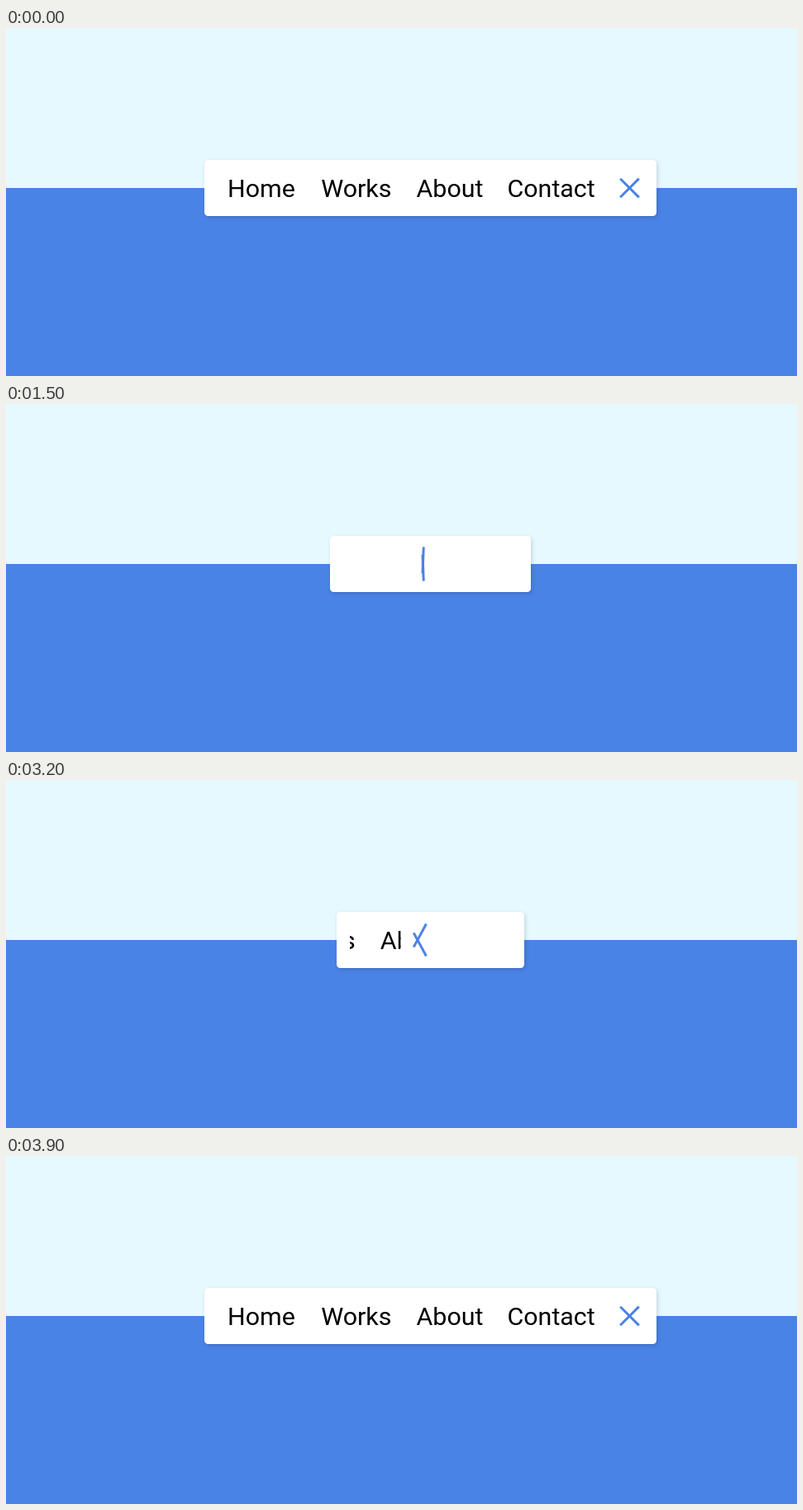
Write an HTML page with a canvas that moves like this. It is 957 px wide and 422 px high and loops after 5 s.

```html
<!DOCTYPE html>
<html lang="en">
<head>
<meta charset="utf-8">
<title>Folding navigation</title>
<style>
  html, body { margin: 0; width: 100%; height: 100%; overflow: hidden; background: #e5f9ff; }
  canvas { display: block; }
</style>
</head>
<body>
<canvas id="stage" width="957" height="422"></canvas>
<script>
const ctx = document.getElementById('stage').getContext('2d');

const LOOP = 5000, TICK = 100;
const SKY = '#e5f9ff', BLUE = '#4a83e6';
const BAR = { cx: 513.5, top: 160, height: 68, closed: 79, open: 547, pad: 16, radius: 4.5 };
const ICON = { width: 46, mid: 25, y: 194, gap: 4.5, length: 32, weight: 3, turn: 765, shift: 6.36 };

// Word origins, measured from the centre of the list
const WORDS = [['Home', -222.5], ['Works', -109.3], ['About', 6], ['Contact', 116]];

const CLOSE = { start: 900, time: 923 };
const OPEN = { start: 2910, time: 918 };

const clamp = v => Math.max(0, Math.min(1, v));
const progress = (t, move) => clamp((t - move.start) / move.time);

function drawBackground() {
  ctx.fillStyle = SKY;
  ctx.fillRect(0, 0, 957, 194);
  ctx.fillStyle = BLUE;
  ctx.fillRect(0, 194, 957, 228);
}

function drawBar(x, width) {
  ctx.save();
  ctx.shadowColor = 'rgba(0, 0, 0, 0.15)';
  ctx.shadowBlur = 5;
  ctx.shadowOffsetX = 1.5;
  ctx.shadowOffsetY = 2;
  ctx.fillStyle = '#fff';
  ctx.beginPath();
  ctx.roundRect(x, BAR.top, width, BAR.height, BAR.radius);
  ctx.fill();
  ctx.restore();
}

function drawWords(x, width) {
  ctx.save();
  ctx.beginPath();
  ctx.rect(x, BAR.top, width, BAR.height);
  ctx.clip();
  ctx.fillStyle = '#000';
  ctx.font = '30.4px Roboto, Arial, sans-serif';
  for (const [word, dx] of WORDS) ctx.fillText(word, x + width / 2 + dx, 205);
  ctx.restore();
}

// side: -1 for the upper line, 1 for the lower one
function drawLine(x, side, p) {
  ctx.save();
  ctx.translate(x, ICON.y + side * ICON.gap);
  ctx.rotate(side * ICON.turn * p * Math.PI / 180);
  ctx.translate(0, -side * ICON.shift * p);
  ctx.fillStyle = BLUE;
  ctx.fillRect(-ICON.length / 2, -ICON.weight / 2, ICON.length, ICON.weight);
  ctx.restore();
}

function draw(t) {
  const opening = t >= OPEN.start;
  const p = opening ? progress(t, OPEN) : 1 - progress(t, CLOSE);
  const left = Math.round(BAR.cx - (BAR.closed + (BAR.open - BAR.closed) * p) / 2);
  const width = 2 * (BAR.cx - left);
  const inner = width - 2 * BAR.pad;
  const listX = left + BAR.pad;
  const listWidth = Math.min(inner * p, inner - ICON.width);

  drawBackground();
  drawBar(left, width);
  if (opening || t < CLOSE.start) drawWords(listX, listWidth);
  const iconX = listX + listWidth + ICON.mid;
  drawLine(iconX, -1, p);
  drawLine(iconX, 1, p);
}

function frame() {
  // The motion advances in ten steps a second
  draw(Math.floor(performance.now() % LOOP / TICK) * TICK);
  requestAnimationFrame(frame);
}
frame();
</script>
</body>
</html>
```
